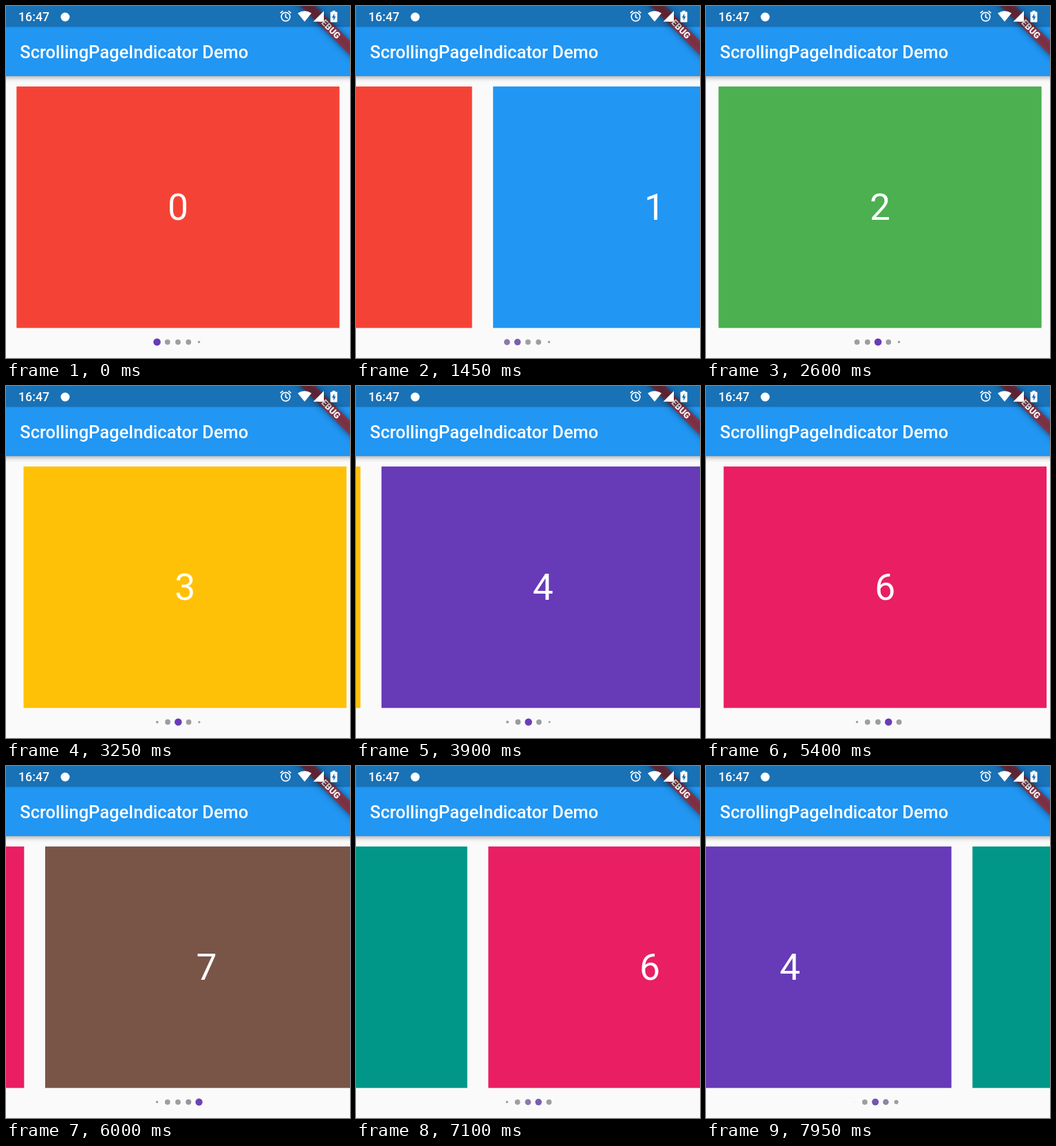
An HTML page with a canvas for the animation above (8 s loop, 500x512 px).

```html
<!DOCTYPE html>
<html lang="en">
<head>
<meta charset="utf-8">
<title>ScrollingPageIndicator Demo</title>
<style>
  html, body { margin: 0; width: 100%; height: 100%; overflow: hidden; background: #fafafa; }
  canvas { display: block; width: 500px; height: 512px; }
</style>
</head>
<body>
<canvas id="stage" width="500" height="512"></canvas>
<script>
const ctx = document.getElementById('stage').getContext('2d');
const W = 500, H = 512, LOOP = 8000, DP = W / 393;

const PAGES = ['#f44336', '#2196f3', '#4caf50', '#ffc107', '#673ab7', '#009688', '#e91e63', '#795548'];
const CARD = { x: 15.3, y: 117.1, w: 469.4, h: 351.2 };

// Swipe start times in ms, forward then backward.
const FORWARD = [1100, 1863, 2600, 3311, 4031, 4751, 5470];
const BACKWARD = [6170, 6860, 7547];

const DOT = { y: 488.8, space: 15.25, normal: 7.8, selected: 10.6, visible: 5 };
const GRAY = [158, 158, 158], PURPLE = [103, 58, 183];

const clamp = (v, lo, hi) => Math.min(hi, Math.max(lo, v));
const swipe = ms => ms <= 0 ? 0 : 1 - Math.exp(-Math.pow(ms / 351, 2.2));
const progress = (starts, t) => starts.reduce((sum, s) => sum + swipe(t - s), 0);
const pagePosition = t => progress(FORWARD, t) - progress(BACKWARD, t);

function text(str, x, y, size, weight = 400, align = 'left') {
  ctx.font = `${weight} ${size}px Roboto, sans-serif`;
  ctx.textAlign = align;
  ctx.fillStyle = '#fff';
  ctx.fillText(str, x, y);
}

function circle(x, y, r) {
  ctx.beginPath();
  ctx.arc(x, y, r, 0, Math.PI * 2);
}

function polygon(...points) {
  ctx.beginPath();
  points.forEach(([x, y]) => ctx.lineTo(x, y));
  ctx.closePath();
  ctx.fill();
}

function drawPages(position) {
  PAGES.forEach((color, i) => {
    const dx = (i - position) * W;
    if (Math.abs(dx) >= W) return;
    ctx.fillStyle = color;
    ctx.fillRect(CARD.x + dx, CARD.y, CARD.w, CARD.h);
    text(String(i), W / 2 + dx, 310.9, 42 * DP, 400, 'center');
  });
}

// Dots shrink near the edges of the visible window, except the first and last page.
function drawDots(position) {
  const center = clamp(position, 2, PAGES.length - 3);
  const half = ((DOT.visible - 1) * DOT.space + DOT.selected) / 2;
  const fade = (DOT.space + (DOT.selected - DOT.normal) / 2) * 0.7;
  PAGES.forEach((_, i) => {
    const dx = (i - center) * DOT.space;
    const edge = half - Math.abs(dx);
    if (edge <= 0) return;
    const active = clamp(1 - Math.abs(i - position), 0, 1);
    const isEnd = i === 0 || i === PAGES.length - 1;
    const limit = isEnd ? DOT.selected / 2 : fade;
    const full = DOT.normal + (DOT.selected - DOT.normal) * active;
    const diameter = full * Math.min(1, edge / limit);
    const rgb = GRAY.map((c, k) => Math.round(c + (PURPLE[k] - c) * active));
    ctx.fillStyle = `rgb(${rgb})`;
    circle(W / 2 + dx, DOT.y, diameter / 2);
    ctx.fill();
  });
}

function drawAppBar() {
  ctx.save();
  ctx.shadowColor = 'rgba(0,0,0,.34)';
  ctx.shadowBlur = 7;
  ctx.shadowOffsetY = 2;
  ctx.fillStyle = '#2196f3';
  ctx.fillRect(-20, -20, W + 40, 122);
  ctx.restore();
  text('ScrollingPageIndicator Demo', 16 * DP, 75.8, 20 * DP, 500);
}

function drawBanner() {
  const top = 28 * DP, height = 12 * DP, reach = 40 * DP * 1.6;
  ctx.save();
  ctx.translate(W, 0);
  ctx.rotate(Math.PI / 4);
  ctx.save();
  ctx.shadowColor = 'rgba(0,0,0,.5)';
  ctx.shadowBlur = 10;
  ctx.shadowOffsetX = 2000;
  ctx.fillStyle = '#000';
  ctx.translate(-2000 * Math.SQRT1_2, 2000 * Math.SQRT1_2);
  ctx.fillRect(-reach, top, reach * 2, height);
  ctx.restore();
  ctx.fillStyle = 'rgba(183,28,28,.627)';
  ctx.fillRect(-reach, top, reach * 2, height);
  text('DEBUG', 0, top + height / 2 + 4.6, 10.2 * DP, 900, 'center');
  ctx.restore();
}

function drawAlarm(x, y) {
  ctx.strokeStyle = '#fff';
  ctx.lineWidth = 1.7;
  circle(x, y, 6.3);
  ctx.stroke();
  ctx.beginPath();
  ctx.moveTo(x, y - 4);
  ctx.lineTo(x, y + 0.5);
  ctx.lineTo(x + 3, y + 2.3);
  for (const side of [-1, 1]) {
    ctx.moveTo(x + side * 4, y - 8.4);
    ctx.lineTo(x + side * 7.8, y - 5.2);
  }
  ctx.stroke();
}

function drawWifi(x, y) {
  ctx.beginPath();
  ctx.moveTo(x, y);
  ctx.lineTo(x - 10, y - 12.3);
  ctx.quadraticCurveTo(x, y - 19, x + 10, y - 12.3);
  ctx.closePath();
  ctx.fill();
}

function drawBattery(x, y) {
  ctx.fillRect(x + 3, y, 4, 3);
  ctx.beginPath();
  ctx.roundRect(x, y + 1.6, 10, 15, 1.2);
  ctx.fill();
  ctx.fillStyle = '#1970b6';
  polygon([x + 5.8, y + 4], [x + 2.2, y + 10.2], [x + 4.4, y + 10.2],
          [x + 4.4, y + 14.6], [x + 7.9, y + 8.4], [x + 5.8, y + 8.4]);
}

function drawStatusBar() {
  ctx.fillStyle = 'rgba(0,0,0,.25)';
  ctx.fillRect(0, 0, W, 30.5);
  text('16:47', 18, 22, 14 * DP, 500);
  circle(86, 16, 6.5);
  ctx.fill();
  drawAlarm(406.5, 15.6);
  drawWifi(434, 22.8);
  polygon([446.5, 22.8], [462, 22.8], [462, 7.3]);
  drawBattery(471.5, 6.8);
}

function draw(t) {
  const position = pagePosition(t);
  ctx.fillStyle = '#fafafa';
  ctx.fillRect(0, 0, W, H);
  drawPages(position);
  drawDots(position);
  drawAppBar();
  drawBanner();
  drawStatusBar();
}

const start = performance.now();
function tick() {
  draw((performance.now() - start) % LOOP);
  requestAnimationFrame(tick);
}
tick();
</script>
</body>
</html>
```
